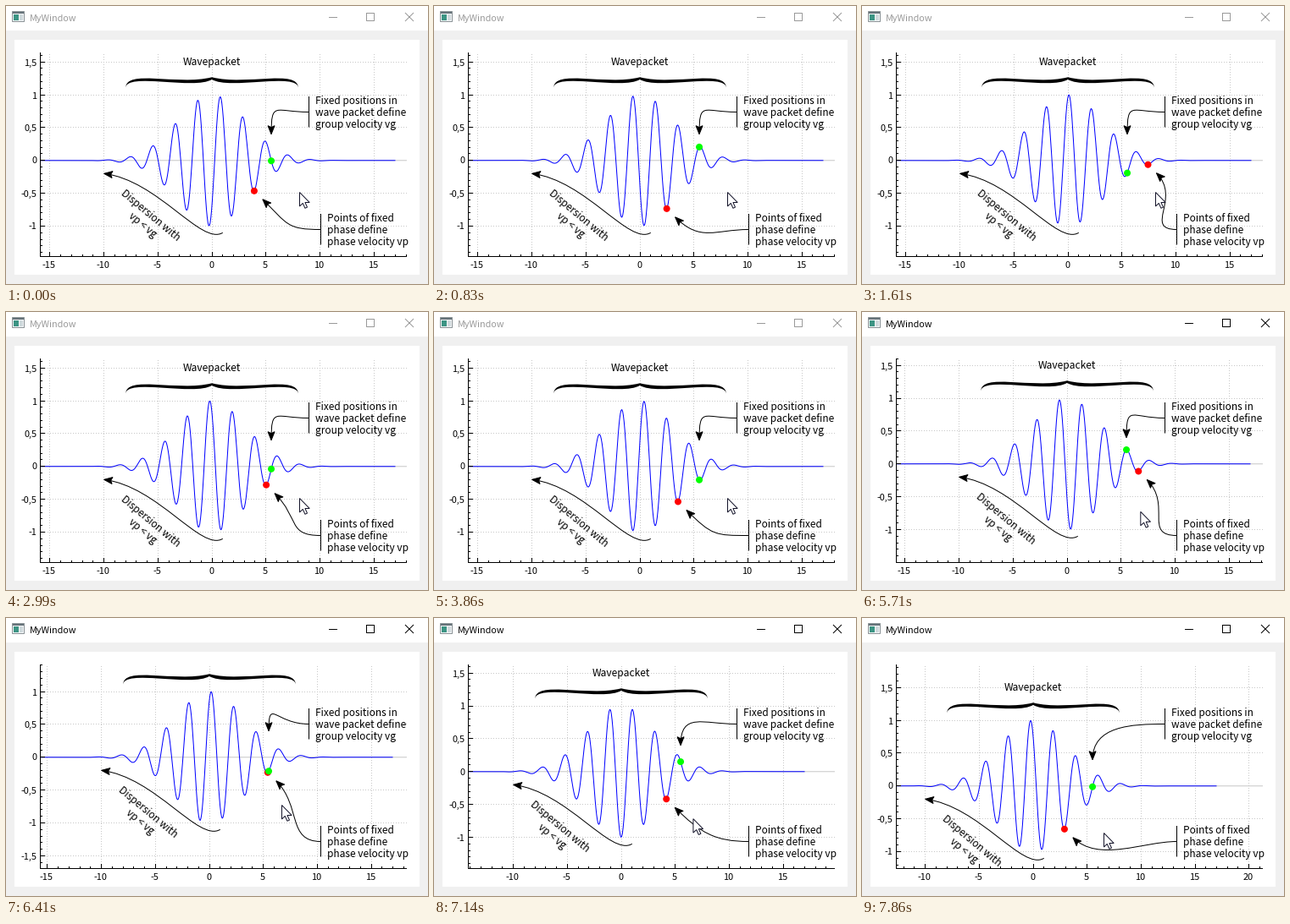
A matplotlib script for the animation above (8000 ms loop, 498x329 px).

```python
import numpy as np
import matplotlib.pyplot as plt
from matplotlib.animation import FuncAnimation
from matplotlib.patches import Circle, PathPatch, Polygon, Rectangle
from matplotlib.path import Path

W, H = 498, 329
PX = 0.72                                  # one pixel in points at 100 dpi
FRAMES, INTERVAL = 200, 40

LEFT, TOP, RIGHT, BOTTOM = 40, 55, 473, 296
SX, SY = (RIGHT - LEFT) / 34, (BOTTOM - TOP) / 3.1   # pixels per unit
X0 = LEFT + 17 * SX - 14 + 0.5             # plot origin, already panned a bit
Y0 = TOP + 1.65 * SY - 1 + 0.5
WAVE_X = np.linspace(-17, 17, 500)
GROUP_KEY = 5.5
KEY_MIN, KEY_START, KEY_SPEED = 2 * np.pi / 3, 3.92, 1.7285
CLICK = 5560

# The display refreshes in uneven steps: (step number, time in ms)
STEPS = np.array([
    (0, 0), (1, 150), (8, 1100), (9, 1250), (12, 1610), (13, 1760),
    (17, 2270), (18, 2420), (22, 2990), (23, 3140), (25, 3410), (26, 3560),
    (28, 3860), (29, 3980), (33, 4490), (34, 4640), (37, 5030), (38, 5170),
    (41, 5560), (42, 5710), (47, 6410), (48, 6560), (49, 6680), (50, 6830),
    (57, 7860)])
TIMES = np.round(np.interp(np.arange(58), STEPS[:, 0], STEPS[:, 1]) / 10) * 10

# time, pointer x, pointer y, drag x, drag y
MOUSE = np.array([
    (4490, 346, 220, 0, 0), (5030, 337, 230, 0, 0),
    (CLICK, 329, 239, 0, 0), (6410, 325, 221, -3, -18),
    (7860, 285, 254, -41, 16)])

plt.rcParams["font.family"] = ["Noto Sans CJK JP", "DejaVu Sans"]
fig = plt.figure(figsize=(W / 100, H / 100), dpi=100, facecolor="#f0f0f0")
ax = fig.add_axes([0, 0, 1, 1])
ax.set_xlim(0, W)
ax.set_ylim(H, 0)
ax.axis("off")


def box(x, y, w, h, **kw):
    kw = {"lw": 0, "zorder": 0, **kw}
    return ax.add_patch(Rectangle((x, y), w, h, snap=False, **kw))


def line(xs=(), ys=(), color="black", z=3, **kw):
    return ax.plot(xs, ys, color=color, lw=PX, zorder=z, snap=False,
                   solid_capstyle="butt", dash_capstyle="butt", **kw)[0]


def label(x, y, s, size=12, z=5, **kw):
    return ax.text(x, y, s, fontsize=size * PX, va="baseline", zorder=z, **kw)


def shape(z=5, **kw):
    return ax.add_patch(PathPatch(Path([(0, 0)]), lw=PX, zorder=z, **kw))


def mid(v):
    return np.floor(v) + 0.5


def segments(parts):
    """Join (x1, y1, x2, y2) segments into one broken line."""
    xs, ys = [], []
    for x1, y1, x2, y2 in parts:
        xs += [x1, x2, np.nan]
        ys += [y1, y2, np.nan]
    return xs, ys


# Window frame
box(0, 0, W, 29, fc="white")
box(10, 40, 478, 278, fc="white")
box(7.5, 6.5, 14, 12, fc="#f4f6f7", ec="#8a9296", lw=PX)
box(8, 7, 13, 2, fc="#66737a", zorder=1)
box(9, 10, 6, 7, fc="#3c9484", zorder=1)
box(16, 10, 4, 7, fc="#cfd9dc", zorder=1)
title = label(28, 18, "MyWindow", 10.8)
buttons = [
    line([381, 391], [13.5, 13.5]),
    line([425.5, 434.5, 434.5, 425.5, 425.5], [8.5, 8.5, 17.5, 17.5, 8.5]),
    line([471, 481, np.nan, 471, 481], [8, 18, np.nan, 18, 8]),
]

# Axes
plot_area = box(LEFT, TOP, RIGHT - LEFT, BOTTOM - TOP, fc="none")
grid = line(color="#c8c8c8", z=1, dashes=(1, 2))
zero_line = line(color="#c8c8c8", z=1)
ticks = line(z=4)
line([LEFT + 0.5, LEFT + 0.5, RIGHT], [TOP, BOTTOM + 0.5, BOTTOM + 0.5], z=4)
x_labels = {v: label(0, 0, f"{v:g}", 11, ha="center")
            for v in range(-20, 25, 5)}
y_labels = {v / 2: label(0, 0, f"{v / 2:g}".replace(".", ","), 11, ha="right")
            for v in range(-4, 5)}

# Moving plot items
wave = line(color="blue", z=3)
brace = shape(fc="black", ec="none")
brace_text = label(0, 0, "Wavepacket", ha="center")
spread_text = [label(0, 0, s, ha="center", rotation=-40,
                     rotation_mode="anchor")
               for s in ("Dispersion with", "vp < vg")]
curves = [shape(fc="none", ec="black") for _ in range(3)]
heads = [shape(fc="black", ec="black", joinstyle="miter") for _ in range(3)]
phase_dot = ax.add_patch(Circle((0, 0), 4, fc="red", lw=0, zorder=6))
group_dot = ax.add_patch(Circle((0, 0), 4, fc="lime", lw=0, zorder=7))

for item in [wave, brace, brace_text, phase_dot, group_dot,
             *spread_text, *curves, *heads]:
    item.set_clip_path(plot_area)
    item.set_clip_on(True)

# Fixed notes with their bars
GROUP_TAIL, PHASE_TAIL = np.array([357.5, 125.5]), np.array([371.5, 264.5])
NOTES = [
    (GROUP_TAIL, ("Fixed positions in", "wave packet define",
                  "group velocity vg")),
    (PHASE_TAIL, ("Points of fixed", "phase define", "phase velocity vp")),
]
for (nx, ny), rows in NOTES:
    line([nx, nx], [ny - 18.5, ny + 18], z=5)
    for i, row in enumerate(rows):
        label(nx + 7.5, ny - 9.3 + 14 * i, row, 11.9)

POINTER = np.array([(0, 0), (0, 16.5), (3.8, 12.9), (6.4, 18.8), (9, 17.6),
                    (6.4, 12), (11.7, 12)])
pointer = ax.add_patch(Polygon(POINTER, fc="white", ec="#14142a", lw=PX,
                               zorder=10))


def cubic(*pts):
    return Path(pts, [Path.MOVETO] + [Path.CURVE4] * (len(pts) - 1))


def set_arrow(i, start, start_dir, end_dir, end):
    curves[i].set_path(cubic(start, start_dir, end_dir, end))
    d = (end - end_dir) / np.hypot(*(end - end_dir))
    side = 4 * np.array([-d[1], d[0]])
    heads[i].set_path(Path([end, end - 10 * d + side, end - 8 * d,
                            end - 10 * d - side, end], closed=True))


def set_brace(center, half, depth=13):
    def at(u, v):
        return center + np.array([u * half, v * depth])
    brace.set_path(cubic(
        at(1, 1), at(1, -0.8), at(0.4, 0.8), at(0, 0),
        at(-0.4, 0.8), at(-1, -0.8), at(-1, 1),
        at(-1, -0.5), at(-0.2, 1.2), at(0, 0.2),
        at(0.2, 1.2), at(1, -0.5), at(1, 1)))


def set_axes(ox, oy):
    lines, marks = [], []
    for v in range(-20, 25):
        x = mid(ox + SX * v)
        inside = LEFT < x < RIGHT
        major = v % 5 == 0
        if inside:
            marks.append((x, BOTTOM - (5 if major else 2), x, BOTTOM))
        if major:
            x_labels[v].set_position((x - 1, 310.5))
            x_labels[v].set_visible(inside)
            if inside:
                lines.append((x, BOTTOM - 1, x, TOP))
    for n in range(-20, 21):
        y = mid(oy - SY * n / 10)
        inside = TOP <= y <= BOTTOM
        major = n % 5 == 0
        if inside:
            marks.append((LEFT + 1, y, LEFT + (6 if major else 3), y))
        if major:
            y_labels[n / 10].set_position((36.3, y + 4))
            y_labels[n / 10].set_visible(inside)
            if inside and n:
                lines.append((LEFT, y, RIGHT, y))
    grid.set_data(*segments(lines))
    ticks.set_data(*segments(marks))
    zero_line.set_data([LEFT, RIGHT], [oy, oy])


def draw(frame):
    now = (frame + 1) * INTERVAL - 1
    t = TIMES[TIMES <= now][-1]
    mx, my, dx, dy = (np.interp(t, MOUSE[:, 0], MOUSE[:, c])
                      for c in range(1, 5))
    ox, oy = X0 + round(dx), Y0 + round(dy)

    def at(x, y):
        return np.array([ox + SX * x, oy - SY * y])

    key = KEY_MIN + (KEY_START - KEY_SPEED * t / 1000 - KEY_MIN) % (2 * np.pi)

    def packet(x):
        return -np.exp(-x * x / 20) * np.cos(3 * (x - key))

    set_axes(ox, oy)
    wave.set_data(*at(WAVE_X, packet(WAVE_X)))
    phase_dot.center = at(key, packet(key))
    group_dot.center = at(GROUP_KEY, packet(GROUP_KEY))

    top = at(0, 1.1) - (0, 13)
    set_brace(top, 8 * SX)
    brace_text.set_position(top - (0, 14.5))

    middle = at(-6, -0.9)
    down = np.array([-np.sin(np.radians(40)), np.cos(np.radians(40))])
    for text, shift in zip(spread_text, (-3, 12)):
        text.set_position(middle + shift * down)

    left = np.array([-40, 0])
    tip = at(GROUP_KEY, 0.4)
    set_arrow(0, GROUP_TAIL, GROUP_TAIL + left, tip - (0, 40), tip)
    tip = np.array(phase_dot.center) + 10
    set_arrow(1, PHASE_TAIL, PHASE_TAIL + left, tip + 30, tip)
    set_arrow(2, at(1, -1.1), at(-1, -1.3), at(-5, -0.3), at(-10, -0.2))

    shade = "black" if t >= CLICK else "#999999"
    for item in (title, *buttons):
        item.set_color(shade)
    pointer.set_xy(POINTER + (mx + 0.5, my + 0.5))


ani = FuncAnimation(fig, draw, frames=FRAMES, interval=INTERVAL,
                    init_func=lambda: draw(0), repeat=True)
plt.show()
```
